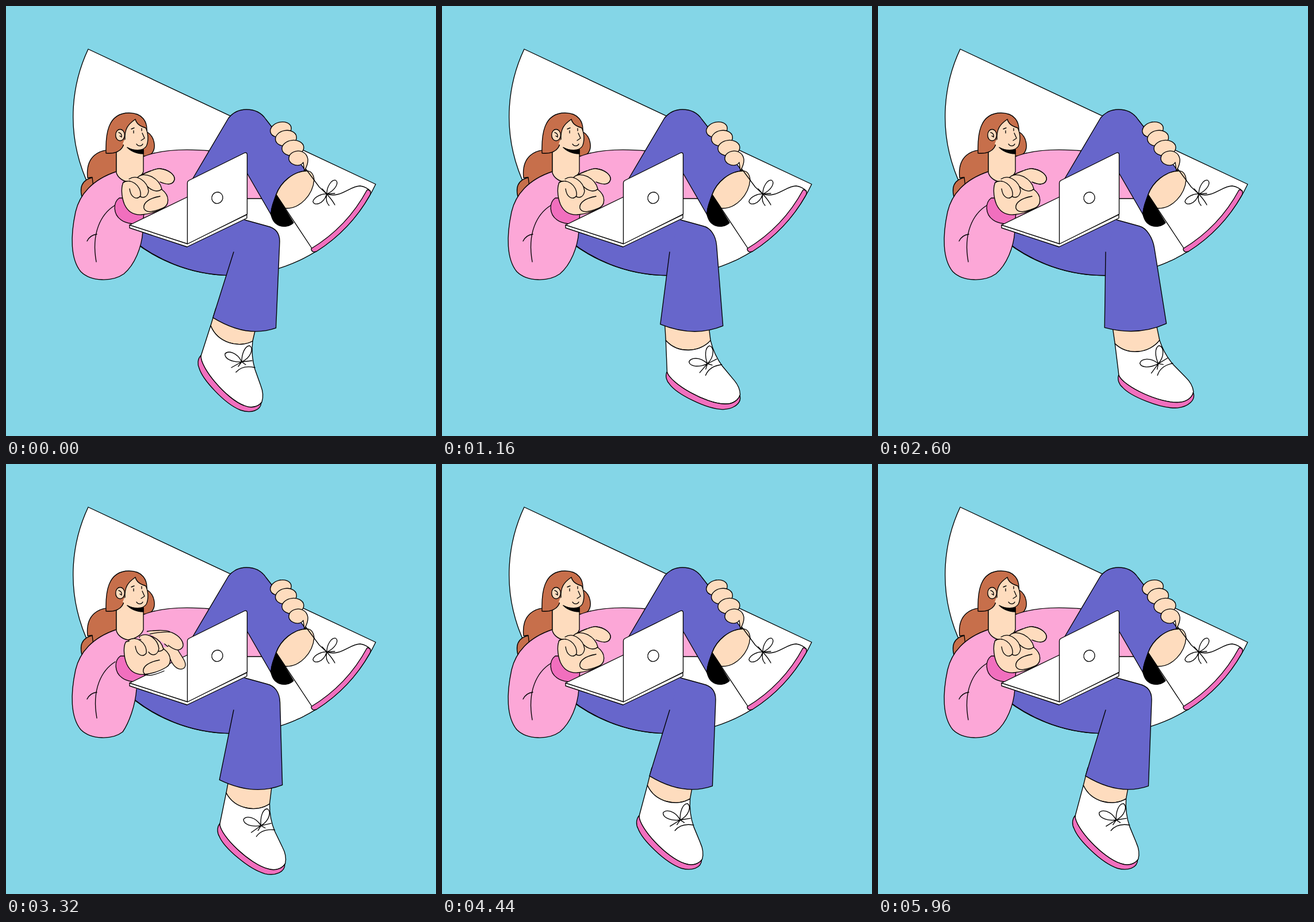
Recreate the animation shown at these times as an HTML page. Size 748 by 748 pixels, loop 6040 ms.

```html
<!DOCTYPE html>
<html lang="en">
<head>
<meta charset="utf-8">
<title>Lounging with a laptop</title>
<style>
  html, body { margin: 0; width: 100%; height: 100%; overflow: hidden; background: #84d6e7; }
  svg { display: block; width: 100vw; height: 100vh; }
  path, ellipse { stroke: #000; stroke-width: 1.35; stroke-linejoin: round; stroke-linecap: round; fill: none; }
  .white { fill: #fff; }
  .pink { fill: #fca7d7; }
  .rose { fill: #f16fbe; }
  .blue { fill: #6766cb; }
  .skin { fill: #fedcbe; }
  .hair { fill: #c76f4b; }
  .ink { fill: #000; }
  .flat { stroke: none; }
</style>
</head>
<body>
<svg viewBox="0 0 748 748">
  <!-- half disc -->
  <path class="white" d="M143 75L643 310A276.2 276.2 0 0 1 143 75Z"/>

  <!-- hair behind the shoulders -->
  <path class="hair" d="M160 297C138 298 126 309 132 332L170 320Z"/>
  <path class="hair" d="M192 251C160 247 138 263 142 299L150 298L152 315L192 292Z"/>
  <path class="hair" d="M245 219C258 226 262 246 254 256C250 260 244 262 236 261L236 225Z"/>

  <!-- torso -->
  <path class="pink flat" d="M192 290L239 262C270 249 310 248 356 252L420 270L445 335H316L225 390L140 380Z"/>
  <path d="M239 262C270 249 310 248 356 252M400 335H445"/>

  <!-- raised leg and its shoe -->
  <path class="blue" d="M325 300L387 195C396 184 406 180 418 180C432 180 444 185 452 197L522 287C500 288 478 306 470 328C466 340 461 350 461 363L420 292"/>
  <path class="ink" d="M470 328L500 377C494 383 484 385 476 382C468 379 464 374 461 363C460 352 466 340 470 328Z"/>
  <path class="skin" d="M522 287C500 288 478 306 470 328L486 352C512 353 534 328 536 302C535 292 530 286 522 287Z"/>
  <path d="M470 328L533 423M519 280L545 315L558 327C582 335 598 313 616 313C624 314 630 318 634 322"/>
  <path class="rose" d="M628 320C633 319 636 324 633 329A276 276 0 0 1 540 427C535 429 531 427 531 422A268 268 0 0 0 628 320Z"/>
  <path d="M558 327C558 314 566 302 573 303C580 306 574 320 558 327C550 326 536 332 534 340C535 348 552 346 558 327M550 318L558 327L572 326M558 327C564 334 568 338 572 346M558 327C556 336 558 343 562 347"/>

  <!-- hand on the knee -->
  <ellipse class="skin" cx="478" cy="215" rx="18.5" ry="13" transform="rotate(-14 478 215)"/>
  <ellipse class="skin" cx="487" cy="230" rx="18.5" ry="13.5" transform="rotate(-10 487 230)"/>
  <ellipse class="skin" cx="499" cy="247" rx="19" ry="13.5" transform="rotate(-6 499 247)"/>
  <path class="skin" d="M517 272C514 277 506 279 499 275C489 270 490 259 500 254C512 249 523 255 525 266C526 275 522 281 519 287Z"/>

  <!-- swinging leg -->
  <g id="shoe">
    <path class="skin" d="M356 556L365 526L439 540L429 583C405 596 368 586 356 556Z"/>
    <path class="white" d="M356 556L339 609C338 630 384 684 414 695C428 701 440 696 445 689C448 680 447 670 443 660L433 632C428 615 427 600 429 583C405 596 368 586 356 556Z"/>
    <path class="rose" d="M339 608C333 614 333 624 336 630C342 650 380 692 408 703C426 709 443 704 444 690C440 696 428 701 414 695C384 684 338 630 339 608Z"/>
    <path d="M410 619C392 620 380 613 381 605C386 599 402 602 410 619C410 604 416 591 424 591C431 596 426 612 410 619L428 617M410 619L392 629M410 619L404 627M410 619L417 624M400 637C408 628 420 626 433 629"/>
  </g>
  <path class="blue flat" d="M200 389A276.2 276.2 0 0 0 402 468.6L396 428L455 383L415 372L240 380Z"/>
  <path d="M200 389A276.2 276.2 0 0 0 400 468.6"/>
  <path id="shin" class="blue"/>

  <!-- head -->
  <path id="sleeve" class="pink"/>
  <path id="crease" d="M189 347C165 362 148 395 157 445"/>
  <path d="M158 397C149 398 144 403 141 409"/>
  <path class="skin" d="M192 250V290C194 297 201 304 212 306C226 304 236 297 239 288V250L215 230Z"/>
  <path class="ink" d="M211 246C219 254 229 257 239 257V250C229 253 219 250 211 246Z"/>
  <path class="hair" d="M174 256C173 225 176 186 214 186C238 186 246 202 245 218L225 225L206 232C206 246 198 258 174 256Z"/>
  <path class="skin flat" d="M206 232C206 214 212 206 225 197C227 206 236 210 243 212C248 222 248 236 244 244C238 253 222 252 211 246L203 240Z"/>
  <path d="M207 232C206 214 212 206 225 197C227 206 236 210 243 212C248 222 248 236 244 244C238 253 222 252 211 246"/>
  <ellipse class="skin" cx="198.5" cy="224.5" rx="7.8" ry="10"/>
  <path d="M196 220C200 221 202 224 201 228L198 226M222 217V221M236 213V217M218 214L223 212M237 221L241 230L235 234M227 240C230 245 236 244 238 240"/>

  <!-- cuff, laptop, typing hand -->
  <path id="cuff" class="rose" d="M197 334C186 342 186 362 200 372C208 378 226 381 238 379L240 360L205 334Z"/>
  <path class="white" d="M215 381L316 332L419 363V369L315 419L215 386Z"/>
  <path d="M215 381L315 413.5L419 363"/>
  <g id="hand"></g>
  <path class="white" d="M315.5 414V308C315.5 305 317 304 319 303L414 256C418 254 419.5 256 419.5 259V362Z"/>
  <ellipse class="white" cx="367.5" cy="333.7" rx="9.5" ry="10" transform="rotate(30 367.5 333.7)"/>
</svg>
<script>
const LOOP = 6040, SWING = 1520, REACH = 740, TAP = 480;
const byId = id => document.getElementById(id);
const clamp = x => Math.max(0, Math.min(1, x));
const smooth = x => x * x * (3 - 2 * x);
const ease = x => x < 0.5 ? (2 * x) ** 2.75 / 2 : 1 - (2 - 2 * x) ** 2.75 / 2;

// outline, then shift and turn while typing
const index = 'M232 296C240 291 262 282 268 283C284 285 294 294 293 302C290 312 280 311 268 306';
const hand = [
  [index, 13, -2, 20],
  ['M232 308C244 316 246 324 250 332C255 342 263 347 270 344C276 341 275 334 270 326L256 304', 38, 12, 0],
  ['M205 306C200 312 200 330 206 345C212 358 222 364 236 363C250 362 262 358 274 351C284 346 285 330 272 320C262 310 235 300 225 303Z', 4, 3, 0],
  [index, 18, 2, 16],
  ['M229 298C240 287 266 298 271 318C266 324 255 323 246 314', 3, 4, 0],
  ['M214 301C228 292 246 305 248 322C246 334 236 336 230 328', 18, -1, 0],
  ['M203 308C216 298 236 312 234 330C228 338 217 334 215 318', 10, -1, 0],
  ['M268 331C250 334 238 342 240 352C244 362 260 357 276 350', -1, 10, 0]
];
const moving = hand.map(([d, ...motion], i) => {
  const el = document.createElementNS('http://www.w3.org/2000/svg', 'path');
  el.setAttribute('d', d);
  if (i < hand.length - 1) el.setAttribute('class', 'skin');
  byId('hand').append(el);
  return [el, ...motion];
});
moving.push([byId('cuff'), 2, 0, 0], [byId('crease'), 1, -3, 0]);

const place = (el, x, y, turn, cx, cy) =>
  el.setAttribute('transform', `translate(${x} ${y}) rotate(${turn} ${cx} ${cy})`);

function polar(x, y, length, degrees) {
  const a = degrees * Math.PI / 180;
  return [x + length * Math.cos(a), y + length * Math.sin(a)];
}

// s runs from 0 (leg tucked in) to 1 (leg kicked out); the foot trails the shin
function drawLeg(t) {
  const out = t < REACH;
  const s = out ? ease(t / REACH) : 1 - ease((t - REACH) / (SWING - REACH));
  const speed = 4 * s * (1 - s), drag = out ? speed : -speed;
  place(byId('shoe'), 110 * s ** 0.82, 8.7 * speed + 5.3 * drag, 6 * drag - 25 * s ** 0.6, 410, 619);

  const [lx, ly] = polar(396, 428, 119.6 + 18 * s, 107.5 - 25.5 * s);
  const [rx, ry] = polar(lx, ly, 111 - 5 * s, 9.4 - 20 * s);
  const kx = 476 + 11 * s * s, ky = 411 + 15 * s;
  const bend = 18 / Math.hypot(rx - kx, ry - ky);
  byId('shin').setAttribute('d', `M396 428L${lx} ${ly}`
    + `Q${(lx + rx) / 2 + 4} ${(ly + ry) / 2 + 27 - 12 * s} ${rx} ${ry}L${kx} ${ky}`
    + `C${kx - (rx - kx) * bend} ${ky - (ry - ky) * bend} 467 386 455 383L415 372`);
}

// taps since a typing spell began, zero outside the spell
const tapPhase = (t, begin, count) => clamp((t - begin) / (count * TAP)) * count % 1;

function drawArm(t) {
  const phase = tapPhase(t, 120, 2) + tapPhase(t, 2080, 5);
  const k = smooth(clamp(1.6 * Math.sin(Math.PI * phase) - 0.4));
  moving.forEach(([el, x, y, turn]) => place(el, x * k, y * k, turn * k, 240, 296));
  byId('sleeve').setAttribute('d', 'M192 288C150 302 128 328 121 358C112 400 112 440 130 462'
    + `C148 480 185 480 ${205 - 2 * k} 466C${224 - 10 * k} 450 ${236 - 11 * k} 420 ${238 - 11 * k} 392`);
}

const start = performance.now();
function tick() {
  const t = (performance.now() - start) % LOOP;
  drawLeg(t % SWING);
  drawArm(t);
  requestAnimationFrame(tick);
}
tick();
</script>
</body>
</html>
```
